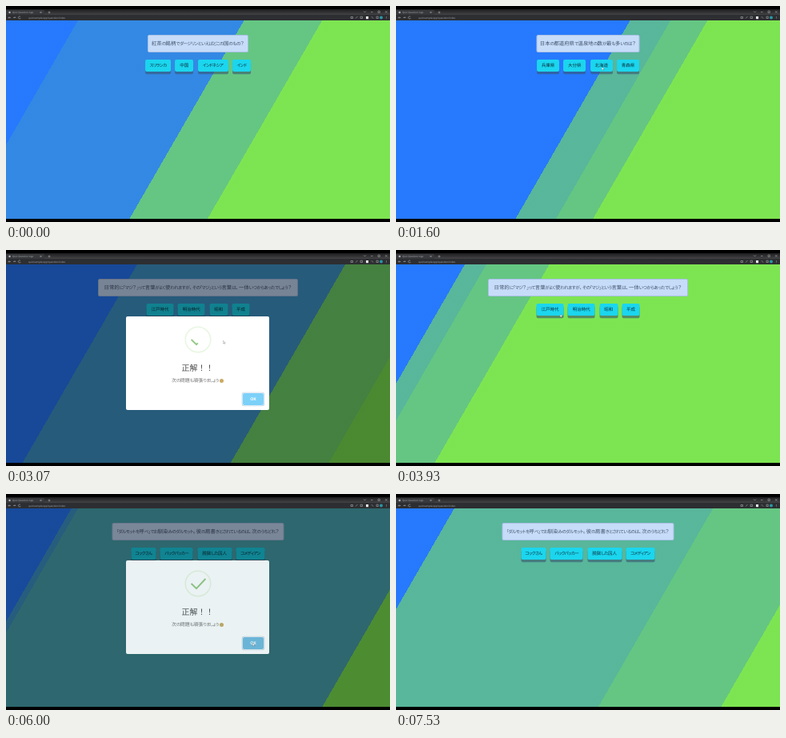
An HTML page that plays this animation: 480 px wide and 270 px high, repeating every 7590 ms.

```html
<!DOCTYPE html>
<html lang="ja">
<head>
<meta charset="utf-8">
<title>Quiz</title>
<style>
html, body { margin: 0; width: 100%; height: 100%; overflow: hidden; background: #000; }
body { font-family: "Noto Sans CJK JP", "Noto Sans CJK", "Noto Sans", sans-serif; text-rendering: geometricPrecision; }
#stage { position: relative; width: 480px; height: 270px; overflow: hidden; background: #000; }
#stage div, #stage span, #stage svg { position: absolute; box-sizing: border-box; white-space: nowrap; }
#bar { left: 0; top: 4px; width: 480px; height: 14px; background: linear-gradient(#1c1c1e, #444446 7px, #2d2e31 7px); color: #a4a6a9; }
#bar span { font: 3px/4px "Noto Sans", sans-serif; }
#tab { left: 0; top: 1px; width: 48px; height: 6px; background: #38393c; border-radius: 1.5px 1.5px 0 0; }
#bar svg { left: 0; top: 0; }
#page { left: 0; top: 18px; width: 480px; height: 248px; overflow: hidden; background: #fff; }
#page .slide { left: -240px; top: 0; width: 960px; height: 248px; opacity: .5;
  background: linear-gradient(-60deg, #6be139 50%, #0866fc 50%); }
#question { top: 18px; height: 22px; border: 1px solid #a9bfe6; border-radius: 2px; background: #c6dcf8;
  color: #43536d; font-size: 6.4px; line-height: 20px; --kana: 5.6px; }
#question, #answers { left: 50%; transform: translateX(-50%); }
#question, #answers div, #note { display: flex; justify-content: center; font-feature-settings: "palt"; }
#question b { font-weight: 400; }
i { font-style: normal; font-size: var(--kana); letter-spacing: -.55px; }
u { text-decoration: none; letter-spacing: .6px; }
#answers { top: 49px; display: flex; gap: 5.3px; }
#stage #answers div { position: relative; height: 14.5px; border-radius: 2px; background: #1bd6ee; color: #0d2f3d;
  font-size: 5.5px; font-weight: 500; line-height: 14.5px; box-shadow: 0 3.2px rgba(55, 85, 112, .6); --kana: 5.4px; }
#overlay { inset: 0; background: rgba(0, 0, 0, .4); }
#modal { left: 150px; top: 65px; width: 179px; height: 117px; border-radius: 2px; background: #fff; }
#icon { left: 70px; top: 8.5px; }
#title { left: 0; top: 57px; width: 179px; text-align: center; font-size: 10px; font-weight: 500; line-height: 14px; color: #4c4c4c; }
#note { left: 0; top: 75px; width: 179px; font-size: 6px; line-height: 10px; color: #707070; --kana: 5.4px; }
#stage #face { position: static; width: 5px; height: 5px; margin: 2.5px 0 0 1px; border-radius: 50%; }
#ok { left: 146px; top: 95.5px; width: 26px; height: 15.5px; border-radius: 2px; background: #7cd1f9; color: #fff;
  box-shadow: 0 0 0 .4px #fff, 0 0 0 1.3px rgba(43, 114, 165, .29);
  font: 600 5.2px/15.5px "Noto Sans", sans-serif; text-align: center; }
#cursor { left: 0; top: 0; }
</style>
</head>
<body>
<div id="stage">
  <div id="bar">
    <div id="tab"></div>
    <span style="left:8px;top:2px">Quiz Question App</span>
    <span style="left:28px;top:8.5px">quiz/sample/app/question/index</span>
    <svg width="480" height="14" fill="none" stroke="#a9abaf" stroke-width=".6">
      <circle cx="4.5" cy="4" r="1.2" fill="#b9bbbe" stroke="none"/>
      <path d="M42.5 3l2 2m0-2l-2 2M52.500 4h3m-1.500-1.500v3M447 2.500l1.500 1.500 1.500-1.500M456 3.500h2.500M465 2.200h2.300v2.300h-2.300zM474 2.200l2.500 2.500m0-2.500l-2.500 2.500"/>
      <path d="M6 10.500H3l1.200-1.200M3 10.500l1.200 1.200M9 10.500h3l-1.200-1.200M18 9.500a1.500 1.500 0 1 0 .3 1.500M431 9.500h2.500v2h-2.500zM437 11.500l2.500-2.500M443 9.200h2.500v2.300h-2.500zM457 9.200l2 2.400M463 9.200h2.300v2.300H463z"/>
      <path d="M450 9h3v3.200h-3z" fill="#eee" stroke="none"/>
      <circle cx="469" cy="10.500" r="2" fill="#2497a6" stroke="none"/>
      <path d="M475.500 9v3.200" stroke-dasharray=".8 .5"/>
    </svg>
  </div>
  <div id="page">
    <div class="slide"></div><div class="slide"></div><div class="slide"></div>
    <div id="question"></div>
    <div id="answers"></div>
    <div id="overlay">
      <div id="modal">
        <svg id="icon" width="40" height="40" viewBox="-20 -20 40 40" fill="none">
          <circle r="15.750" stroke-width="1.500"/>
          <path pathLength="1" stroke-dasharray="1 2" stroke-width="1.900"/>
        </svg>
        <div id="title"></div>
        <div id="note"></div>
        <div id="ok">OK</div>
      </div>
    </div>
  </div>
  <svg id="cursor" width="5" height="6"><path d="M.3 .2v3.800l1-.8.6 1.300.7-.3-.6-1.300h1.200z" fill="#fff" stroke="#333" stroke-width=".25"/></svg>
</div>
<script>
const LOOP = 7590, STEP = 0.2;   // each drawn step is 0.2 s of page time
const START = 17.585;

const questions = [
  ['紅茶の銘柄でダージリンといえばどこの国のもの？', 126,
    { スリランカ: 32, 中国: 23, インドネシア: 38, インド: 23 }],
  ['日本の都道府県で温泉地の数が最も多いのは？', 129,
    { 兵庫県: 28, 大分県: 28, 北海道: 28, 青森県: 28 }],
  ['次のうち、俳句の季語として認定されていないものはどれ？', 148,
    { ミザン: 25, ポーレン: 27, キーラン: 27, 杉原灯吾: 32 }],
  ['日常的に「マジ？」って言葉がよく使われますが、その「マジ」という言葉は、一体いつからあったでしょう？', 250,
    { 江戸時代: 34, 明治時代: 34, 昭和: 23, 平成: 22 }],
  ['深海の塔モルネアの敵役として登場するドレル少佐。さて、彼の年齢はいくつでしょう？', 209,
    { '28歳': 23, '32歳': 23, '50歳': 23, '62歳': 23 }],
  ['「ダルモットを呼べ」でお馴染みのダルモット。彼の肩書きとされているのは、次のうちどれ？', 215,
    { コックさん: 31, バックパッカー: 41, 脱獄した囚人: 43, コメディアン: 36 }]
];

// open step, close step, correct
const dialogs = [
  [6.7, 15.9, false], [25.6, 33.67, true], [43.6, 52.7, true],
  [62.6, 72.8, false], [80.6, 89.92, true]
];

// step, x, y
const path = [
  [3, 262, 96], [6, 223, 76], [13, 309, 189], [16, 309, 189], [24, 257, 76], [26, 257, 76],
  [31, 309, 187], [33, 309, 187], [34, 300, 166], [42, 252, 76], [44, 252, 76],
  [50, 309, 187], [53, 309, 187], [58, 205, 80], [63, 205, 80], [70, 307, 185],
  [73, 307, 185], [79, 226, 76], [81, 226, 76], [87, 308, 186], [90, 308, 186], [98, 330, 200]
];

const looks = {
  true: { title: '正解！！', face: '#c9ab62', ring: 'rgba(165,220,134,.25)', mark: '#94c983', d: 'M-8.4 0L-2 6.2L9.400-6' },
  false: { title: '残念！！', face: '#b0705f', ring: '#c9707c', mark: '#c9707c', d: 'M-6.300-6.300L6.300 6.300M6.300-6.300L-6.300 6.300' }
};

const $ = id => document.getElementById(id);
const clamp = v => Math.min(1, Math.max(0, v));
const mix = (a, b, p) => a + (b - a) * p;

// kana are set narrower than kanji, punctuation wider
const typeset = s => s.replace(/[ぁ-ヿ「」]+/g, '<i>$&</i>').replace(/[、。？！]/g, '<u>$&</u>');

function bezier(x1, y1, x2, y2) {
  const at = (a, b, s) => 3 * a * s * (1 - s) ** 2 + 3 * b * s * s * (1 - s) + s ** 3;
  return x => {
    let lo = 0, hi = 1;
    for (let n = 0; n < 24; n++) {
      const mid = (lo + hi) / 2;
      if (at(x1, x2, mid) < x) lo = mid; else hi = mid;
    }
    return at(y1, y2, lo);
  };
}
const ease = bezier(.25, .1, .25, 1);
const easeInOut = bezier(.42, 0, .58, 1);

// piecewise linear lookup in rows of [position, ...values]
function track(rows, pos) {
  const n = rows.findIndex(r => r[0] > pos);
  if (n === 0) return rows[0].slice(1);
  if (n < 0) return rows[rows.length - 1].slice(1);
  const a = rows[n - 1], b = rows[n], p = (pos - a[0]) / (b[0] - a[0]);
  return a.slice(1).map((v, i) => mix(v, b[i + 1], p));
}

const slides = [...document.querySelectorAll('.slide')];
const [ring, mark] = $('icon').children;
const pop = [[0, .5], [.45, 1.05], [.8, .95], [1, 1]];

function drawSlides(time) {
  slides.forEach((el, i) => {
    const phase = (time / (3 + i) + (i === 1 ? 1 : 0)) % 2;
    const p = easeInOut(phase > 1 ? 2 - phase : phase);
    el.style.transform = `translateX(${mix(-240, 240, p)}px)`;
  });
}

let shown = -1;
function drawQuestion(n) {
  if (n === shown) return;
  shown = n;
  const [text, width, answers] = questions[n];
  $('question').style.width = width + 'px';
  $('question').innerHTML = `<b>${typeset(text)}</b>`;
  $('answers').innerHTML = Object.entries(answers)
    .map(([label, w]) => `<div style="width:${w}px">${typeset(label)}</div>`).join('');
}

function drawDialog(k) {
  const dialog = dialogs.find(([open, close]) => k >= open && k < close + 1.5);
  $('overlay').style.display = dialog ? 'block' : 'none';
  if (!dialog) return;
  const [open, close, right] = dialog;
  const look = looks[right];
  const age = (k - open) * STEP, gone = (k - close) * STEP;
  const fade = len => gone > 0 ? 1 - ease(clamp(gone / len)) : ease(clamp(age / len));
  $('overlay').style.opacity = fade(.3);
  $('modal').style.opacity = fade(.2);
  $('modal').style.transform = `scale(${track(pop, age / .3)[0]})`;
  $('title').textContent = look.title;
  $('note').innerHTML = typeset('次の問題も頑張りましょう') + `<span id="face" style="background:${look.face}"></span>`;
  $('ok').style.background = gone > 0 ? '#70bce0' : '#7cd1f9';
  ring.setAttribute('stroke', look.ring);
  mark.setAttribute('stroke', look.mark);
  mark.setAttribute('d', look.d);
  mark.setAttribute('stroke-dashoffset', right ? 1 - clamp((age - .3) / .4) : 0);
  $('icon').style.opacity = right ? 1 : clamp(age / .5);
}

function drawCursor(k) {
  const [x, y] = track(path, k);
  const visible = k >= path[0][0] && k <= path[path.length - 1][0];
  $('cursor').style.display = visible ? 'block' : 'none';
  $('cursor').style.transform = `translate(${x}px, ${y}px)`;
}

function draw(ms) {
  const k = Math.floor((ms % LOOP + 3.4) * .015);
  drawSlides(START + k * STEP);
  drawQuestion(dialogs.filter(d => d[0] <= k).length);
  drawDialog(k);
  drawCursor(k);
}

const begin = performance.now();
function tick() {
  draw(performance.now() - begin);
  requestAnimationFrame(tick);
}
tick();
</script>
</body>
</html>
```
